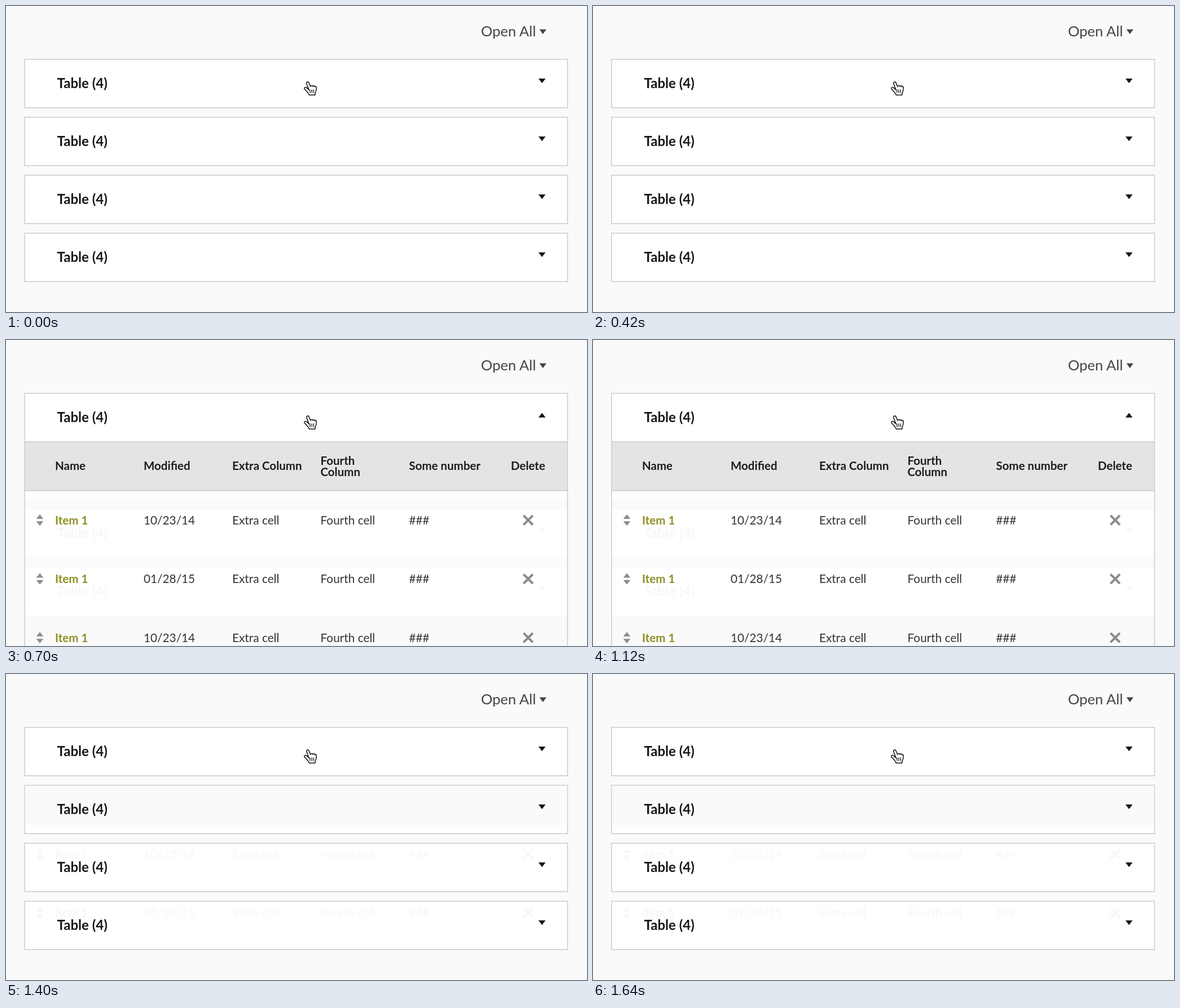
An HTML page for the animation above (1800 ms loop, 1030 by 544 pixels).

```html
<!DOCTYPE html>
<html lang="en">
<head>
<meta charset="utf-8">
<title>Accordion tables</title>
<style>
  html, body { margin: 0; width: 100%; height: 100%; overflow: hidden; background: #fafafa; }
  svg { display: block; width: 1030px; height: 544px; font-family: Lato, sans-serif; }
  .title { font-size: 24px; font-weight: 700; }
  .head { font-size: 20.5px; font-weight: 700; fill: #1c1c1c; }
  .cell { font-size: 20.8px; }
  .link { font-size: 20.5px; font-weight: 700; }
</style>
</head>
<body>
<svg id="stage" viewBox="0 0 1030 544" xmlns="http://www.w3.org/2000/svg"></svg>
<script>
const LOOP = 1800, OPEN_AT = 700, CLOSE_AT = 1400;
const INK = '#161616', LINE = '#cbcbcb', PAGE = '#fafafa', GHOST = '#f7f7f7';
const PITCH = 103;
const COLS = [87, 244, 401, 557.5, 714.5];
const DATES = ['10/23/14', '01/28/15', '10/23/14'];

const rect = (x, y, w, h, fill) =>
  `<rect x="${x}" y="${y}" width="${w}" height="${h}" fill="${fill}"/>`;
const text = (cls, x, y, str, fill = '') =>
  `<text class="${cls}" x="${x}" y="${y}" ${fill && `fill="${fill}"`}>${str}</text>`;
const down = (x, y, w, h, fill) =>
  `<path d="M${x} ${y}h${w}l${-w / 2} ${h}z" fill="${fill}"/>`;
const up = (x, y, w, h, fill) =>
  `<path d="M${x} ${y + h}h${w}l${-w / 2} ${-h}z" fill="${fill}"/>`;

const box = (i, fill = '#fff') =>
  `<rect x="33" y="${94.8 + i * PITCH}" width="962.5" height="86" fill="${fill}" stroke="${LINE}" stroke-width="1.5"/>`;
const title = (i, fill = INK) => text('title', 90.5, 146 + i * PITCH, 'Table (4)', fill);
const closedArrow = (i, fill = INK) => down(944, 129 + i * PITCH, 12.5, 8.3, fill);

// One table row; a ghost colour replaces every normal colour.
function row(i, ghost) {
  const mid = 320 + i * 104.5, base = mid + 7.5;
  const grey = ghost || '#8c8c8c', ink = ghost || '#333';
  const cells = [DATES[i], 'Extra cell', 'Fourth cell', '###'];
  return up(53.7, mid - 10, 12.6, 8, grey) + down(53.7, mid + 2.3, 12.6, 8, grey) +
    text('link', COLS[0], base, 'Item 1', ghost || '#8e8f23') +
    cells.map((c, k) => text('cell', COLS[k + 1], base, c, ink)).join('') +
    `<path d="M917.5 ${mid - 8}l16.5 16.5m0 -16.5l-16.5 16.5" stroke="${grey}" stroke-width="4" fill="none"/>`;
}

function closed(fading) {
  let s = '';
  for (let i = 0; i < 4; i++) s += box(i);
  if (fading) {
    s += rect(33.8, 198.6, 961, 70, PAGE) + row(0, GHOST) + row(1, GHOST);
  }
  for (let i = 0; i < 4; i++) s += title(i) + closedArrow(i);
  return s;
}

function opened() {
  let s = rect(33, 95, 962.5, 460, '#fff');
  s += rect(33, 283, 962.5, 18, PAGE) + rect(33, 386, 962.5, 18, PAGE) + rect(33, 490, 962.5, 60, PAGE);
  for (const i of [2, 3]) s += title(i, GHOST) + closedArrow(i, GHOST);
  s += rect(33, 181, 962.5, 87, '#e4e4e4');
  s += `<path d="M33 560V94.8H995.5V560M33 180.8H995.5M33 268H995.5" fill="none" stroke="${LINE}" stroke-width="1.5"/>`;
  s += title(0) + up(944, 129.5, 12.5, 8.3, INK);
  const heads = [[COLS[0], 230.5, 'Name'], [COLS[1], 230.5, 'Modified'], [COLS[2], 230.5, 'Extra Column'],
    [COLS[3], 221.5, 'Fourth'], [COLS[3], 241.5, 'Column'], [COLS[4], 230.5, 'Some number'], [895, 230.5, 'Delete']];
  s += heads.map(h => text('head', ...h)).join('');
  for (let i = 0; i < 3; i++) s += row(i);
  return s;
}

const toolbar = text('', 842, 53.5, 'Open All', '#444').replace('class=""', 'font-size="25.6"') +
  down(945.7, 41.5, 12.3, 8.5, '#444');

const hand = `<g stroke-linejoin="round" stroke-linecap="round">
  <path d="M537.2 149.5L533 138.2C532 135.4 535.4 133.5 537 136.4L540 143.2C540.3 141 543.3 140.7 544 143C544.6 141.2 547 141.4 547.4 143.7C548.3 142.4 550.3 143.2 550.3 145.2C550.5 149 549.8 151.4 548.4 154.2L547.8 158.3H537.6C536.8 155.4 534.4 153.3 532.2 150.8C530.6 149 528.8 147.6 528.8 146.2C529 144.2 531.8 143.8 533.4 145.6L535.8 148" fill="#fff" stroke="#111" stroke-width="1.5"/>
  <path d="M539 149v5M542.2 149v5M545.4 149v5" stroke="#111" stroke-width="1.3"/>
</g>`;

const stage = document.getElementById('stage');
const scenes = { idle: closed(false), open: opened(), fading: closed(true) };
let shown = '';

function draw(t) {
  const name = t < OPEN_AT ? 'idle' : t < CLOSE_AT ? 'open' : 'fading';
  if (name === shown) return;
  shown = name;
  stage.innerHTML = rect(0, 0, 1030, 544, PAGE) + toolbar + scenes[name] + hand;
}

const start = performance.now();
function tick() {
  draw((performance.now() - start) % LOOP);
  requestAnimationFrame(tick);
}
tick();
</script>
</body>
</html>
```
